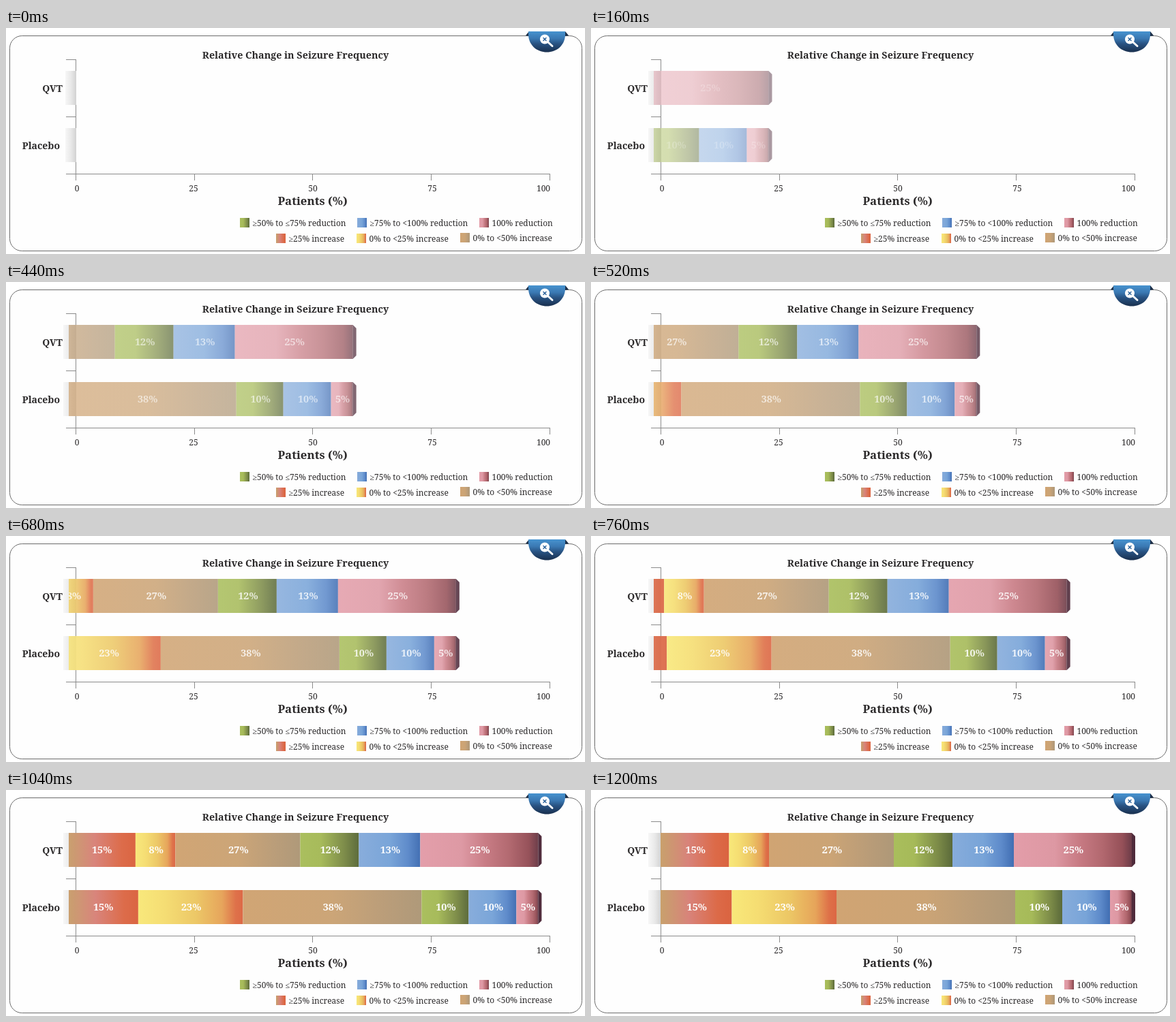
An HTML page with a canvas for the animation above (8 s loop, 849 by 332 pixels).

```html
<!DOCTYPE html>
<html lang="en">
<head>
<meta charset="utf-8">
<title>Relative change chart</title>
<style>
html, body { margin: 0; width: 100%; height: 100%; overflow: hidden; background: #fff; }
canvas { display: block; }
</style>
</head>
<body>
<canvas id="stage" width="849" height="332"></canvas>
<script>
const ctx = document.getElementById('stage').getContext('2d');
const LOOP = 8000, STEP = 40, SLIDE = 1200, TRAVEL = 709;
const AXIS_X = 103, CLIP_X = 92, BAR_END = 793, BAR_H = 50;
const SERIF = '"Noto Serif", "Liberation Serif", serif';

// Gradient stops as [offset, colour]
const FILL = {
  orange: [[0, '#c9a06c'], [.1, '#cb9a70'], [.4, '#d8837a'], [.8, '#dc6a48'], [1, '#da6340']],
  yellow: [[0, '#f8e87a'], [.25, '#f5dd72'], [.55, '#ecc765'], [.8, '#e6a45a'], [.93, '#de7048'], [1, '#dc6744']],
  tan: [[0, '#d0a473'], [.5, '#cba476'], [.8, '#b99c78'], [1, '#ae9878']],
  green: [[0, '#a9be5c'], [.35, '#a6ba59'], [.75, '#7c8b48'], [1, '#5b6a3a']],
  blue: [[0, '#87acdb'], [.5, '#78a4d8'], [.8, '#5d8aca'], [1, '#416eb2']],
  pink: [[0, '#e39da9'], [.35, '#dd98a3'], [.55, '#c87b84'], [.75, '#b2686f'], [.92, '#955058'], [1, '#6c3c48']]
};
const ORDER = ['orange', 'yellow', 'tan', 'green', 'blue', 'pink'];
const BARS = [
  { name: 'QVT', nameX: 83, y: 63, edges: [102, 202.5, 261, 444, 530, 620, BAR_END], values: [15, 8, 27, 12, 13, 25] },
  { name: 'Placebo', nameX: 79, y: 147, edges: [102, 206.5, 360, 622, 691, 761, BAR_END], values: [15, 23, 38, 10, 10, 5] }
];
const LEGEND = [
  ['green', 343, 279, '≥50% to ≤75% reduction'],
  ['blue', 515, 279, '≥75% to <100% reduction'],
  ['pink', 694, 279, '100% reduction'],
  ['orange', 396, 302, '≥25% increase'],
  ['yellow', 514, 302, '0% to <25% increase'],
  ['tan', 666, 301, '0% to <50% increase']
];

function gradient(x0, y0, x1, y1, stops) {
  const g = ctx.createLinearGradient(x0, y0, x1, y1);
  stops.forEach(([at, color]) => g.addColorStop(at, color));
  return g;
}

function block(x, y, w, h, stops) {
  ctx.fillStyle = gradient(x, 0, x + w, 0, stops);
  ctx.fillRect(x, y, w, h);
}

function text(str, x, y, size, { weight = 'bold', align = 'center', color = '#2b292a' } = {}) {
  ctx.font = `${weight} ${size}px ${SERIF}`;
  ctx.textAlign = align;
  ctx.fillStyle = color;
  ctx.fillText(str, x, y);
}

function polygon(points, fill) {
  ctx.beginPath();
  points.forEach(([x, y]) => ctx.lineTo(x, y));
  ctx.closePath();
  ctx.fillStyle = fill;
  ctx.fill();
}

function line(x0, y0, x1, y1) {
  ctx.beginPath();
  ctx.moveTo(x0, y0);
  ctx.lineTo(x1, y1);
  ctx.stroke();
}

function drawPanel() {
  ctx.fillStyle = '#fff';
  ctx.fillRect(0, 0, 849, 332);
  ctx.lineWidth = 1;
  ctx.strokeStyle = '#6b6b6b';
  ctx.fillStyle = '#fefefe';
  ctx.beginPath();
  ctx.roundRect(5.5, 11.5, 839, 316, 18);
  ctx.fill();
  ctx.stroke();
}

function drawBadge() {
  polygon([[762, 11], [767, 5], [767, 12]], '#1c2f49');
  polygon([[825, 11], [820, 5], [820, 12]], '#1c2f49');
  ctx.fillStyle = gradient(0, 5, 0, 35, [[0, '#4793cf'], [.35, '#3a78b2'], [.6, '#285383'], [1, '#1a3150']]);
  ctx.beginPath();
  ctx.moveTo(766, 5);
  ctx.lineTo(820, 5);
  ctx.lineTo(820, 11);
  ctx.bezierCurveTo(819, 26, 807, 35.5, 793, 35.5);
  ctx.bezierCurveTo(779, 35.5, 767, 26, 766, 11);
  ctx.fill();

  ctx.lineCap = 'round';
  ctx.strokeStyle = '#fff';
  ctx.lineWidth = 3;
  line(795, 21, 801, 26.5);
  ctx.fillStyle = '#fff';
  ctx.beginPath();
  ctx.arc(790, 16.5, 7, 0, Math.PI * 2);
  ctx.fill();
  ctx.lineWidth = 1.5;
  ctx.strokeStyle = '#2c639c';
  line(788, 14.5, 792, 18.5);
  line(792, 14.5, 788, 18.5);
  ctx.lineCap = 'butt';
}

function drawAxes() {
  ctx.strokeStyle = '#8b8b8b';
  ctx.lineWidth = 1;
  line(102.5, 46, 102.5, 224);
  [46.5, 130.5].forEach(y => line(88, y, 103, y));
  line(88, 214.5, 798, 214.5);
  [276.5, 449.5, 623.5, 797.5].forEach(x => line(x, 214, x, 224));
  [[0, 104], [25, 275], [50, 450], [75, 625], [100, 788]].forEach(([n, x]) =>
    text(n, x, 240, 12, { weight: 'normal' }));
}

function drawLabels() {
  text('Relative Change in Seizure Frequency', 424.5, 45, 14.3);
  text('Patients (%)', 449.5, 260, 16.8);
  BARS.forEach(bar => text(bar.name, bar.nameX, bar.y + 31, 14, { align: 'right' }));
  LEGEND.forEach(([key, x, y, label]) => {
    block(x, y, 14, 14, FILL[key]);
    text(label, x + 18.5, y + 12, 11.95, { weight: 'normal', align: 'left' });
  });
}

function drawBar(bar, shift, ease, started) {
  const left = started ? 84 : 87;
  block(left, bar.y, AXIS_X - left, BAR_H, [[0, '#f7f7f7'], [.5, '#e9e9e9'], [1, '#d2d2d2']]);
  if (!started) return;

  ctx.save();
  ctx.beginPath();
  ctx.rect(CLIP_X, bar.y, 800 - CLIP_X, BAR_H);
  ctx.clip();
  ctx.translate(-shift, 0);
  const barAlpha = .3 + .7 * ease;
  ORDER.forEach((key, i) => {
    const x = bar.edges[i], w = bar.edges[i + 1] - x;
    ctx.globalAlpha = barAlpha;
    block(x, bar.y, w, BAR_H, FILL[key]);
    ctx.globalAlpha = ease;
    text(bar.values[i] + '%', x + w / 2 + 1, bar.y + 30, 14.5, { color: '#fff' });
  });
  ctx.globalAlpha = barAlpha;
  const top = bar.y, bottom = bar.y + BAR_H;
  polygon([[BAR_END, top], [798, top + 5], [798, bottom - 5], [BAR_END, bottom]], '#4f2b3b');
  ctx.restore();
}

function render(now) {
  const t = Math.floor((now % LOOP) / STEP) * STEP;
  const left = (1 - Math.min(t / SLIDE, 1)) ** 2;
  drawPanel();
  drawBadge();
  drawAxes();
  drawLabels();
  BARS.forEach(bar => drawBar(bar, TRAVEL * left, 1 - left, t > 0));
}

const start = performance.now();
function tick() {
  render(performance.now() - start);
  requestAnimationFrame(tick);
}
tick();
</script>
</body>
</html>
```
